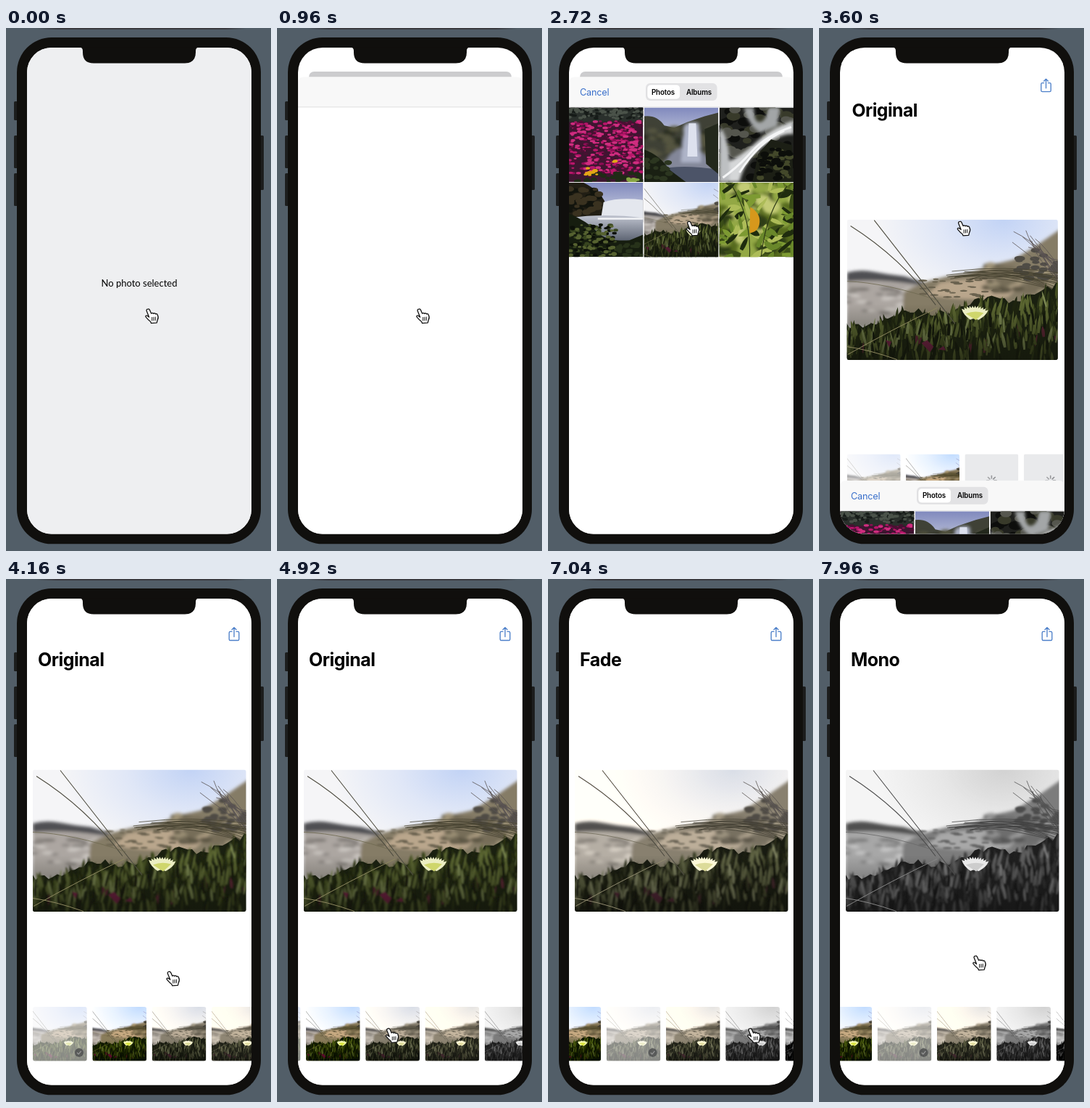
Write an HTML page that moves like this. It is 366 px wide and 720 px high and loops after 8 s.

```html
<!DOCTYPE html>
<html lang="en">
<head>
<meta charset="utf-8">
<title>Photo filters</title>
<style>
html, body { margin: 0; width: 100%; height: 100%; overflow: hidden; background: #525e68; }
#stage { display: block; width: 366px; height: 720px; }
text { font-family: Inter, "Noto Sans", sans-serif; }
.empty { font: 13px Lato, sans-serif; }
.title { font-size: 25px; font-weight: 700; letter-spacing: -.55px; }
.cancel { font-size: 12.7px; letter-spacing: -.2px; fill: #3a70cb; }
.tab { font-size: 9.75px; font-weight: 600; letter-spacing: -.12px; }
</style>
</head>
<body>
<svg id="stage" viewBox="0 0 366 720" xmlns="http://www.w3.org/2000/svg">
  <defs id="defs">
    <clipPath id="screen"><rect x="29" y="27" width="310" height="669.5" rx="34"/></clipPath>
    <clipPath id="card"><rect x="29" y="27" width="310" height="670" rx="8"/></clipPath>
    <clipPath id="thumbClip"><rect width="74.8" height="74.5" rx="3"/></clipPath>
    <clipPath id="mainClip"><rect width="294.5" height="195.5" rx="3"/></clipPath>
    <linearGradient id="topShade">
      <stop offset="0" stop-color="#2c2427" stop-opacity="0"/><stop offset=".1" stop-color="#2c2427" stop-opacity=".6"/>
      <stop offset=".9" stop-color="#2c2427" stop-opacity=".6"/><stop offset="1" stop-color="#2c2427" stop-opacity="0"/>
    </linearGradient>
    <radialGradient id="blue" cx=".74" cy="0" r=".6">
      <stop offset="0" stop-color="#c2d3f5"/><stop offset=".5" stop-color="#e0e7f7"/><stop offset="1" stop-color="#f5f5f7"/>
    </radialGradient>
    <linearGradient id="shade" x2="0" y2="1">
      <stop offset=".6" stop-color="#12150a" stop-opacity="0"/><stop offset="1" stop-color="#12150a" stop-opacity=".6"/>
    </linearGradient>
    <linearGradient id="dusk" x2="0" y2="1">
      <stop offset="0" stop-color="#8089bd"/><stop offset=".5" stop-color="#d3d7e4"/>
    </linearGradient>
    <linearGradient id="pool" x2="0" y2="1">
      <stop offset="0" stop-color="#bfc3cf"/><stop offset="1" stop-color="#434b5a"/>
    </linearGradient>
    <filter id="haze"><feGaussianBlur stdDeviation=".8"/></filter>
    <filter id="mist"><feGaussianBlur stdDeviation="2.2"/></filter>
  </defs>
  <rect width="366" height="720" fill="#525e68"/>
  <rect x="42" width="290" height="2" fill="url(#topShade)"/>
  <g fill="#1c1d1d">
    <rect x="11" y="101" width="8" height="26" rx="1.5"/><rect x="11" y="148" width="8" height="45" rx="1.5"/>
    <rect x="11" y="200" width="8" height="45" rx="1.5"/><rect x="348" y="148" width="8" height="75" rx="1.5"/>
  </g>
  <rect x="15" y="13" width="337" height="697.3" rx="48" fill="#100f0d"/>
  <g clip-path="url(#screen)">
    <rect x="29" y="27" width="310" height="670" fill="#fff"/>
    <g id="presenter"><g clip-path="url(#card)">
      <rect id="paper" x="29" y="27" width="310" height="670"/>
      <text id="empty" class="empty" x="184" y="355.5" text-anchor="middle">No photo selected</text>
      <g id="editor">
        <path fill="none" stroke="#4c7fc9" stroke-width="1.35" stroke-linecap="round" stroke-linejoin="round" d="M312 72.3h-2.2q-1.6 0-1.6 1.6v9q0 1.6 1.6 1.6h10.4q1.6 0 1.6-1.6v-9q0-1.6-1.6-1.6H318M315 79.5V67M312 69.8l3-3 3 3"/>
        <text id="title" class="title" x="44" y="119.5"></text>
        <g transform="translate(37 262.5)" clip-path="url(#mainClip)"><use id="main" href="#dune"/></g>
        <g id="strip"></g>
      </g>
      <rect id="dim" x="29" y="27" width="310" height="670"/>
    </g></g>
    <g id="sheet">
      <path d="M29 700V8q0-8 8-8H331q8 0 8 8V700z" fill="#fff"/>
      <path d="M29 41.5V8q0-8 8-8H331q8 0 8 8V41.500z" fill="#f8f8f8"/>
      <rect x="29" y="41" width="310" height=".8" fill="#d9d9da"/>
      <g id="picker">
        <text class="cancel" x="44" y="25.2">Cancel</text>
        <rect x="135" y="8.5" width="98.5" height="24" rx="6" fill="#e2e2e4"/>
        <rect x="137" y="10.5" width="45.5" height="20" rx="5" fill="#fff" stroke="#d4d4d6" stroke-width=".5"/>
        <text class="tab" x="159" y="24" text-anchor="middle">Photos</text>
        <text class="tab" x="208.5" y="24" text-anchor="middle">Albums</text>
        <g id="grid"></g>
      </g>
    </g>
  </g>
  <path d="M101 26.5q5 0 5 5v2q0 15 15 15h126q15 0 15-15v-2q0-5 5-5z" fill="#100f0d"/>
  <g id="hand" stroke="#111" stroke-linejoin="round" stroke-linecap="round">
    <path fill="#fff" stroke-width="1.3" d="M3.2 1.2C4.6.4 6 1 6.6 2.4L8.6 7C9.5 6 11 6.2 11.6 7.2 12.6 6.2 14 6.6 14.5 7.8 15.6 7.1 17 7.6 17.3 9 18.4 11 18.6 13.5 17.2 16L16.2 19.8 8.6 20.4 7.6 18.2C5 16.5 3 14 1 11.6.4 10.6 1.4 9.4 2.8 10L5.6 12 2.2 3.6C1.8 2.6 2.2 1.6 3.2 1.2Z"/>
    <path fill="none" d="M9.7 12.4v4.4M12 12.2v4.4M14.3 12v4.4"/>
  </g>
</svg>
<script>
const $ = id => document.getElementById(id);
const LOOP = 8000;

let seed = 7;
const rnd = (a = 0, b = 1) => {
  seed = (seed * 16807) % 2147483647;
  return a + (b - a) * seed / 2147483647;
};
const num = v => v.toFixed(1);
const shape = (d, fill) => `<path d="${d}" fill="${fill}"/>`;
const line = (d, color, width) => `<path d="${d}" fill="none" stroke="${color}" stroke-width="${width}"/>`;
const blur = (kind, ...parts) => `<g filter="url(#${kind})">${parts.join('')}</g>`;

// One layer of scattered marks per colour; mark() returns path data.
const layers = (colors, count, mark) =>
  colors.map(c => shape(Array.from({ length: count }, mark).join(''), c)).join('');

const blob = (x, y, w, h, r, flat = .6) => () => {
  const rx = rnd(r * .5, r), ry = rx * flat;
  return `M${num(rnd(x, x + w) - rx)} ${num(rnd(y, y + h))}a${num(rx)} ${num(ry)} 0 1 0 ${num(2 * rx)} 0a${num(rx)} ${num(ry)} 0 1 0 ${num(-2 * rx)} 0`;
};

const leaf = (x, y, len, width, angle) => {
  const dx = Math.sin(angle) * len, dy = -Math.cos(angle) * len;
  const wx = Math.cos(angle) * width / 2, wy = Math.sin(angle) * width / 2;
  return `M${num(x - wx)} ${num(y - wy)}Q${num(x + dx * .6 - wx * 2)} ${num(y + dy * .6 - wy * 2)} ${num(x + dx)} ${num(y + dy)}` +
    `Q${num(x + dx * .6 + wx * 2)} ${num(y + dy * .6 + wy * 2)} ${num(x + wx)} ${num(y + wy)}z`;
};

function dune() {
  const top = x => 140 - .17 * x + 5 * Math.sin(x / 17);
  const blade = (lo, hi) => () => {
    const x = rnd(-4, 298), y = top(x) + 22 + rnd(lo, hi) * (175 - top(x));
    return leaf(x, y, rnd(14, 27), rnd(1.8, 3.6), rnd(-.28, .32));
  };
  let ridge = 'M-2 200';
  for (let x = -2; x <= 298; x += 6) ridge += `L${x} ${num(top(x) + rnd(2, 12))}`;
  const greens = ['#2d3617', '#454f22', '#1e240f', '#5a6530'];

  let strands = '', plume = '';
  for (let i = 0; i < 16; i++) {
    strands += `M${num(rnd(130, 190))} ${num(rnd(72, 84))}Q${num(rnd(210, 250))} ${num(rnd(62, 78))} 296 ${num(rnd(74, 104))}`;
    plume += `M${num(rnd(225, 275))} ${num(rnd(14, 50))}Q${num(rnd(262, 280))} ${num(rnd(35, 58))} 297 ${num(rnd(55, 95))}`;
  }
  let petals = '';
  for (let i = -5; i <= 5; i++) petals += leaf(178 + i * .8, 138, 18 + Math.abs(i) * .3, 4.6, i * .17 + .06);

  return '<rect width="295" height="196" fill="url(#blue)"/>' +
    blur('mist',
      shape('M0 74Q18 69 38 73T80 79L110 88V100H0z', '#4f4f52'),
      shape('M0 86Q40 82 95 90L150 95V150H0z', '#aca6a1'),
      layers(['#7f7a76', '#c9c4bf'], 18, blob(0, 92, 110, 38, 11, .25)),
      shape('M80 100L112 86 140 79 172 74 205 62 232 56 262 38 300 12V150H75z', '#857b66'),
      shape('M130 88Q190 78 245 88L225 108Q170 115 112 105z', '#b9a68c'),
      layers(['#5d5644', '#a09479', '#766d59'], 24, blob(195, 62, 105, 40, 11, .4))) +
    blur('haze',
      layers(['#4f4c45'], 26, blob(236, 42, 62, 40, 8, .45)),
      layers(['#6a624f'], 30, blob(105, 82, 105, 26, 7, .22))) +
    line(plume, '#5a5353', .8) + line(strands, '#45412f', .75) +
    shape(ridge + 'L298 200z', '#1a2010') +
    blur('haze',
      layers(greens, 62, blade(0, .45)),
      layers(['#5c2234'], 12, blade(.5, .85)),
      layers(greens, 56, blade(.3, 1.1)),
      layers(['#798550'], 34, blade(0, .8)),
      layers(['#12160b'], 46, blade(.3, 1.3)),
      shape('M104 172l8-4 9 9-5 8zM54 168l8 2-3 8zM127 181l8-5 3 6z', '#7a1f49')) +
    '<rect width="295" height="196" fill="url(#shade)"/>' +
    line('M5 9Q75 53 124 119M38 1Q84 60 151 145', '#4e4c40', 1.1) +
    line('M0 86Q55 88 128 113', '#6e6950', .8) +
    line('M1 188Q65 152 126 123M0 177Q30 181 70 195', '#8d875f', 1) +
    shape(petals, '#eceec3') + shape('M166 131Q178 126 191 130L180 140z', '#cfd66c');
}

function meadow() {
  return '<rect width="103" height="103" fill="#3d1630"/><rect width="103" height="20" fill="#2a302c"/>' +
    blur('haze',
      layers(['#161b18', '#4a5249'], 60, blob(0, 0, 103, 16, 3.5)),
      layers(['#8f0d55', '#b8166a', '#4a0f32', '#cf2d7f'], 110, blob(0, 19, 103, 72, 4, .5)),
      layers(['#1f2b16'], 34, blob(0, 90, 103, 13, 5))) +
    layers(['#87a544'], 9, blob(80, 98, 22, 5, 4)) +
    layers(['#e3a616'], 9, blob(22, 82, 17, 13, 4)) +
    layers(['#e3a616'], 2, blob(61, 73, 4, 3, 3.5));
}

function falls() {
  return '<rect width="103" height="103" fill="url(#dusk)"/>' +
    shape('M0 12Q18 10 28 25L42 28 60 20 84 12 103 7V103H0z', '#3f4136') +
    blur('mist',
      layers(['#2b2e22', '#55543f'], 30, blob(0, 28, 103, 50, 9, .5)),
      shape('M28 76Q50 40 85 66L100 88 20 92z', '#838799'),
      shape('M56 24Q66 18 76 22L79 76H51z', '#aeb4c8')) +
    blur('haze',
      shape('M62 22h10l2 46H60z', '#dde1ee'),
      shape('M20 86Q50 78 103 86V103H20z', '#4c5468'),
      shape('M0 58Q22 66 35 86L58 103H0z', '#1a2013'),
      layers(['#2c3620'], 16, blob(0, 72, 36, 28, 6)),
      shape('M84 30L103 22V92L86 78z', '#23281c'));
}

function stream() {
  return '<rect width="103" height="103" fill="#1f201d"/>' +
    blur('haze', layers(['#0d0e0c', '#383a2a', '#55564e'], 30, blob(0, 0, 103, 103, 10, .65))) +
    blur('mist',
      shape('M34 0Q40 24 57 35L80 26 84 0H68Q66 18 57 20T48 0z', '#a3a6a7'),
      shape('M103 18Q70 30 49 50T0 80V103H28Q35 72 62 53T103 37z', '#d5d7d8'),
      shape('M0 26Q17 45 14 103H0z', '#bdc0c2')) +
    blur('haze',
      line('M100 27Q65 39 45 61T5 97M90 32Q55 47 28 90', '#f4f5f6', 3),
      shape('M54 64L72 44 101 52 103 103H46z', '#1c1f15'),
      layers(['#43482a', '#0c0e0a'], 26, blob(54, 58, 45, 42, 6)));
}

function lagoon() {
  return '<rect width="103" height="103" fill="url(#dusk)"/>' +
    shape('M0 0H20Q44 12 51 29L103 24V55H0z', '#211e14') +
    blur('haze',
      layers(['#12140d', '#3a3220'], 28, blob(0, 8, 42, 36, 7)),
      shape('M48 27Q70 20 103 24V52H44z', '#e4e7ee'),
      shape('M0 49Q50 42 103 49V90H0z', 'url(#pool)'),
      line('M40 50H103', '#f2f3f6', 2.4),
      shape('M0 43Q26 54 39 68T84 80L103 72V103H0z', '#161d0f'),
      layers(['#38451f', '#0c1008', '#566230'], 50, blob(0, 58, 66, 45, 4)),
      layers(['#27321a'], 22, blob(66, 84, 37, 19, 5)));
}

function leaves() {
  const sprig = (lo, hi) => () => leaf(rnd(-5, 105), rnd(0, 112), rnd(lo, hi), rnd(3, 7), rnd(-2.4, 2.4));
  return '<rect width="103" height="103" fill="#566a1e"/>' +
    blur('mist', layers(['#c3cb74', '#2f3d14', '#93a844'], 18, blob(0, 0, 103, 103, 13, .8))) +
    blur('haze', layers(['#3a4c17', '#7d9a32', '#adbc58', '#1f2c0e', '#69872a'], 18, sprig(14, 30))) +
    line('M15 0Q45 48 42 103M94 5Q65 40 58 103', '#2c3815', 1.2) +
    shape('M43 34Q57 42 56 55T42 70z', '#d6981c');
}

const scenes = { dune, meadow, falls, stream, lagoon, leaves };
for (const name in scenes) $('defs').insertAdjacentHTML('beforeend', `<g id="${name}">${scenes[name]()}</g>`);

// Square crop of a scene.
const tile = (name, x, y, size, filter = 'none') =>
  `<svg x="${x}" y="${y}" width="${size}" height="${size}" viewBox="${name === 'dune' ? '49.5 0 195 195' : '0 0 103 103'}">` +
  `<use href="#${name}" style="filter:${filter}"/></svg>`;

$('grid').innerHTML = ['meadow', 'falls', 'stream', 'lagoon', 'dune', 'leaves']
  .map((name, i) => tile(name, 29 + i % 3 * 103.8, 42 + Math.floor(i / 3) * 103.3, 102.4)).join('');

const looks = [
  'none',
  'saturate(1.4) contrast(1.1)',
  'saturate(.6) sepia(.15) contrast(1.05)',
  'sepia(.4) saturate(.7)',
  'grayscale(1)',
  'grayscale(1) contrast(1.3)'
];
const spokes = Array.from({ length: 8 }, (_, i) =>
  `<path d="M0-3.5V-7" stroke="#77787b" stroke-width="1.6" stroke-linecap="round" opacity="${.35 + i * .09}" transform="rotate(${i * 45})"/>`).join('');

$('strip').innerHTML = looks.map(f => `<g class="thumb"><g clip-path="url(#thumbClip)">
  <rect class="blank" width="75" height="75" fill="#e9eaec"/><g class="pic">${tile('dune', 0, 0, 74.8, f)}</g></g>
  <g transform="translate(37.4 37.3)"><g class="spin">${spokes}</g></g>
  <g class="check"><circle cx="64" cy="63" r="6" fill="#4a4b4d" opacity=".8"/><path d="M61.2 63l2 2.2 3.6-4.4" fill="none" stroke="#999" stroke-width="1.2"/></g></g>`).join('');

const thumbs = [...document.querySelectorAll('.thumb')].map(el => ({
  el, ...Object.fromEntries(['blank', 'pic', 'spin', 'check'].map(c => [c, el.querySelector('.' + c)]))
}));

const clamp = v => Math.max(0, Math.min(1, v));
const part = (t, a, b) => clamp((t - a) / (b - a));
const smooth = u => u * u * (3 - 2 * u);
const out = u => 1 - (1 - u) ** 3;
const show = (el, on) => el.setAttribute('display', on ? 'inline' : 'none');

// time, x, y
const path = [
  [0, 192, 386], [1700, 192, 386], [2400, 190.5, 265.5], [3700, 190.5, 265.5],
  [4350, 229, 610], [4600, 229, 610], [5130, 108, 622], [5400, 108, 622],
  [5800, 113.5, 624], [6450, 113.5, 624], [7000, 275, 618], [7450, 275, 618], [7960, 212, 518]
];

function handAt(t) {
  const i = path.findIndex(k => k[0] > t);
  if (i < 0) return path[path.length - 1].slice(1);
  const [a, x, y] = path[i - 1], [b, x2, y2] = path[i];
  const u = smooth(part(t, a, b));
  return [x + (x2 - x) * u, y + (y2 - y) * u];
}

function draw(t) {
  const picked = t >= 3300;
  const open = picked ? 1 - out(part(t, 3300, 3888)) : out(part(t, 300, 850));
  const scale = 1 - .097 * open;
  $('presenter').setAttribute('transform', `translate(184 ${27 + 33 * open}) scale(${scale}) translate(-184 -27)`);
  $('paper').setAttribute('fill', picked ? '#fff' : '#eeeff1');
  $('dim').setAttribute('opacity', picked ? 0 : .145 * open);
  show($('empty'), !picked);
  show($('editor'), picked);

  $('sheet').setAttribute('transform', `translate(0 ${696.5 - 629 * open})`);
  show($('sheet'), open > 0);
  show($('picker'), t >= 1250);

  const look = t < 6080 ? 0 : t < 7300 ? 2 : 4;
  $('title').textContent = { 0: 'Original', 2: 'Fade', 4: 'Mono' }[look];
  $('main').style.filter = looks[look];

  const scroll = 121 * smooth(part(t, 4600, 5130));
  const selected = t < 6250 ? 0 : 2;
  thumbs.forEach((th, i) => {
    const ready = i < 2 || t >= 3850;
    th.el.setAttribute('transform', `translate(${37 + i * 82.3 - scroll} 589)`);
    show(th.blank, !ready);
    show(th.spin, !ready);
    th.spin.setAttribute('transform', `rotate(${Math.floor(t / 100) * 45})`);
    show(th.pic, ready);
    th.pic.setAttribute('opacity', i === selected ? .5 : 1);
    show(th.check, i === selected);
  });

  $('hand').setAttribute('transform', `translate(${handAt(t).join(' ')})`);
}

const start = performance.now();
function tick() {
  draw((performance.now() - start) % LOOP);
  requestAnimationFrame(tick);
}
tick();
</script>
</body>
</html>
```
